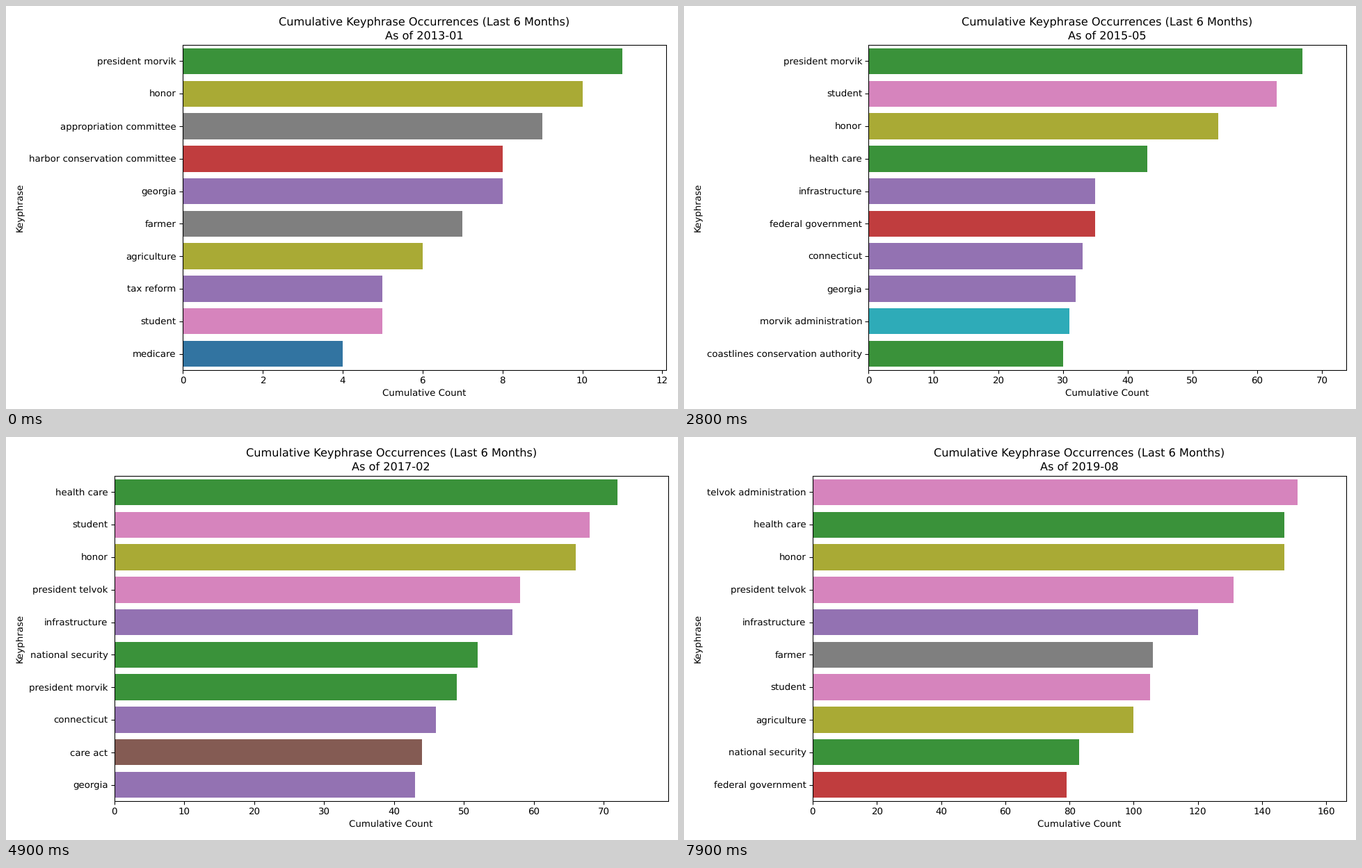
Recreate the animation shown at these times as a matplotlib script. Size 966 by 580 pixels, loop 8 s.

```python
import colorsys

import matplotlib.pyplot as plt
import numpy as np
from matplotlib.animation import FuncAnimation
from matplotlib.colors import to_rgb

DPI = 96.6
MONTHS = 80
START_YEAR = 2013
TOP_N = 10

plt.rcParams.update({
    "font.family": "DejaVu Sans",
    "text.hinting": "none",
    "axes.labelpad": 4.4,
})

PALETTE = {
    "blue": ["medicare"],
    "orange": ["appropriation bill"],
    "green": ["president morvik", "health care", "small business",
              "coastlines conservation authority", "national security"],
    "red": ["harbor conservation committee", "federal government"],
    "purple": ["georgia", "tax reform", "infrastructure", "connecticut"],
    "brown": ["care act"],
    "pink": ["student", "president telvok", "telvok administration"],
    "gray": ["appropriation committee", "farmer", "accessible land act"],
    "olive": ["honor", "agriculture"],
    "cyan": ["government shutdown", "morvik administration"],
}

# Ranked counts at key months (months since January 2013).
RANKINGS = {
    0: {"president morvik": 11, "honor": 10, "appropriation committee": 9,
        "harbor conservation committee": 8, "georgia": 8, "farmer": 7,
        "agriculture": 6, "tax reform": 5, "student": 5, "medicare": 4},
    11: {"health care": 66, "government shutdown": 58, "honor": 53,
         "care act": 49, "accessible land act": 49, "student": 42,
         "federal government": 37, "president morvik": 36, "medicare": 33,
         "georgia": 31},
    20: {"student": 64, "honor": 54, "georgia": 42, "president morvik": 38,
         "health care": 37, "infrastructure": 29, "small business": 25,
         "farmer": 23, "connecticut": 23, "federal government": 22},
    36: {"president morvik": 97, "student": 64, "morvik administration": 50,
         "honor": 49, "federal government": 46, "health care": 46,
         "coastlines conservation authority": 45, "national security": 45,
         "infrastructure": 43, "connecticut": 42},
    49: {"health care": 72, "student": 68, "honor": 66,
         "president telvok": 58, "infrastructure": 57,
         "national security": 52, "president morvik": 49, "connecticut": 46,
         "care act": 44, "georgia": 43},
    68: {"president telvok": 128, "student": 108, "honor": 107,
         "farmer": 104, "infrastructure": 99, "telvok administration": 96,
         "agriculture": 72, "federal government": 65,
         "appropriation bill": 62, "connecticut": 61},
    79: {"telvok administration": 151, "health care": 147, "honor": 147,
         "president telvok": 131, "infrastructure": 120, "farmer": 106,
         "student": 105, "agriculture": 100, "national security": 83,
         "federal government": 79},
}

# Short-lived topics rise and fall between the key months.
EVENTS = {
    "government shutdown": {8: 4, 9: 30, 13: 57, 15: 14},
    "president telvok": {45: 4},
    "president morvik": {54: 22},
    "health care": {55: 105, 60: 98},
}


def muted(name, amount=0.75):
    h, l, s = colorsys.rgb_to_hls(*to_rgb("tab:" + name))
    return colorsys.hls_to_rgb(h, l, s * amount)


COLORS = {p: muted(c) for c, phrases in PALETTE.items() for p in phrases}


def track(phrase):
    """Count of one phrase in every month."""
    knots = dict(EVENTS.get(phrase, {}))
    for month, counts in RANKINGS.items():
        if phrase in counts:
            # A tiny offset keeps the order of ties.
            knots[month] = counts[phrase] - 0.01 * list(counts).index(phrase)
        else:
            knots[month] = 0.6 * min(counts.values())
    xs = sorted(knots)
    return np.interp(np.arange(MONTHS), xs, [knots[x] for x in xs])


def wobble(rng):
    """Rolling six-month noise that vanishes at the key months."""
    noise = np.convolve(rng.normal(size=MONTHS + 5), np.ones(6) / 6, "valid")
    keys = list(RANKINGS)
    phase = np.interp(np.arange(MONTHS), keys, np.arange(len(keys)))
    return 1 + 0.1 * noise * np.abs(np.sin(np.pi * phase))


rng = np.random.default_rng(6)
TRACKS = {p: track(p) * wobble(rng) for p in COLORS}

fig, ax = plt.subplots(figsize=(966.01 / DPI, 580.01 / DPI), dpi=DPI)
MARGIN_Y = 58 / 600


def draw(month):
    top = sorted(TRACKS, key=lambda p: -TRACKS[p][month])[:TOP_N]
    counts = [round(float(TRACKS[p][month])) for p in top]
    year, index = divmod(month, 12)

    ax.clear()
    ax.barh(range(TOP_N), counts, height=0.8, linewidth=0,
            color=[COLORS[p] for p in top])
    ax.set_yticks(range(TOP_N), top)
    ax.set_ylim(TOP_N - 0.5, -0.5)
    ax.set_xlim(0, counts[0] * 1.1)
    ax.set_xlabel("Cumulative Count")
    ax.set_ylabel("Keyphrase")
    ax.set_title(f"As of {START_YEAR + year}-{index + 1:02d}")
    ax.annotate("Cumulative Keyphrase Occurrences (Last 6 Months)",
                (0.5, 1), xycoords="axes fraction", xytext=(0, 21),
                textcoords="offset points", ha="center", fontsize=12)

    # Fit the sides to the labels, keep the height fixed.
    fig.subplots_adjust(left=0.125, right=0.9)
    fig.tight_layout()
    fig.subplots_adjust(bottom=MARGIN_Y, top=1 - MARGIN_Y)


anim = FuncAnimation(fig, draw, frames=MONTHS, interval=100, repeat=True)
plt.show()
```
